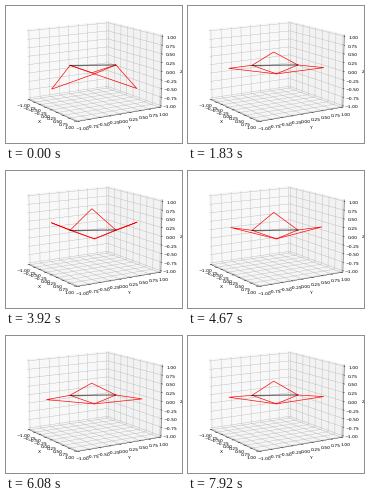
These frames come from a looping animation (176 by 137 pixels, 8 s). A matplotlib script:

```python
import numpy as np
import matplotlib.pyplot as plt
from matplotlib.animation import FuncAnimation

plt.rcParams["text.hinting"] = "none"

W, H, DPI = 176, 137, 32
FRAMES, FPS = 96, 12

# Hinge angle: damped swing released from rest
REST, SWING = np.radians(15.5), np.radians(46.5)
OMEGA, DECAY = np.pi / 3.25, 0.27

# Equilateral base triangle with unit sides, centred on the origin
A = np.array([-0.5, -np.sqrt(3) / 6, 0])
B = np.array([0, np.sqrt(3) / 3, 0])
C = np.array([0.5, -np.sqrt(3) / 6, 0])
HINGES = [(A, C), (C, B), (A, B)]
FLAP = np.sqrt(3) / 2
UP = np.array([0, 0, 1])


def hinge_angle(t):
    wave = np.cos(OMEGA * t) + DECAY / OMEGA * np.sin(OMEGA * t)
    return REST - SWING * np.exp(-DECAY * t) * wave


def flap_path(p, q, angle):
    mid = (p + q) / 2
    out = mid / np.linalg.norm(mid)
    tip = mid + FLAP * (np.cos(angle) * out + np.sin(angle) * UP)
    return np.array([p, tip, q]).T


def add_line(points, color):
    return ax.plot(*np.array(points).T, color=color, lw=1.5, snap=False)[0]


fig = plt.figure(figsize=(W / DPI, H / DPI), dpi=DPI, facecolor="white")
side = 150.8
ax = fig.add_axes([10 / W, -2.4 / H, side / W, side / H],
                  projection="3d", computed_zorder=False)
ax.view_init(elev=12.3, azim=-32)

lim = 25 / 24
ticks = np.linspace(-1, 1, 9)
ax.set(xlim=(-lim, lim), ylim=(-lim, lim), zlim=(-lim, lim),
       xticks=ticks, yticks=ticks, zticks=ticks,
       xlabel="X", ylabel="Y", zlabel="Z")

add_line([A, C, B], "red")
flaps = [add_line([p, q], "red") for p, q in HINGES]
add_line([A, B], "black")


def update(i):
    angle = hinge_angle(i / FPS)
    for line, (p, q) in zip(flaps, HINGES):
        line.set_data_3d(*flap_path(p, q, angle))
    return flaps


anim = FuncAnimation(fig, update, frames=FRAMES, interval=1000 / FPS,
                     repeat=True, repeat_delay=0, blit=False)
plt.show()
```
